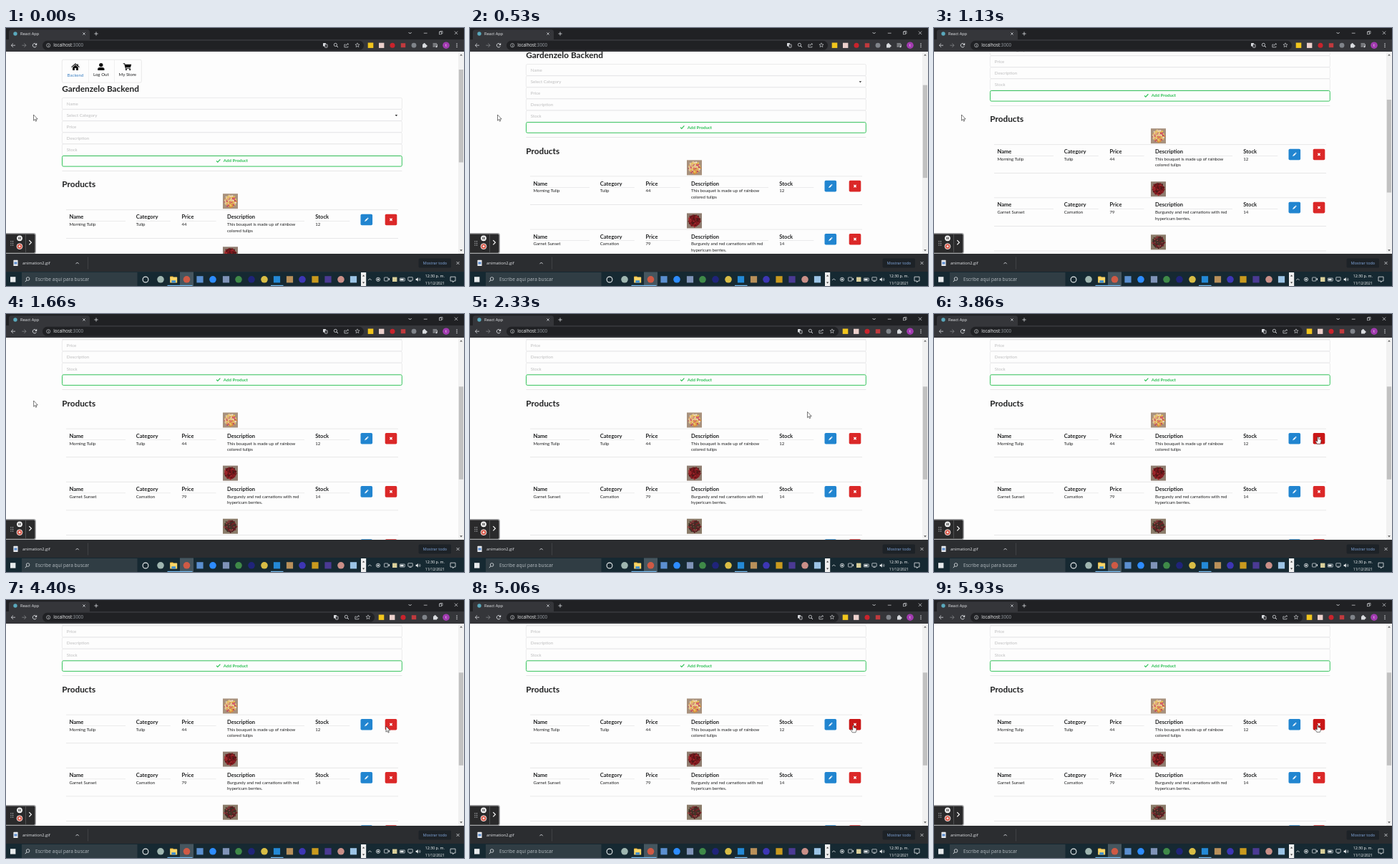
An HTML page with a canvas that plays this animation: 640 by 360 pixels, repeating every 8000 ms.

```html
<!DOCTYPE html>
<html lang="es">
<head>
<meta charset="utf-8">
<title>React App</title>
<style>
html, body { margin: 0; width: 100%; height: 100%; overflow: hidden; background: #fff; }
canvas { display: block; width: 640px; height: 360px; }
</style>
</head>
<body>
<canvas id="stage"></canvas>
<script>
const LOOP = 8000, STEP = 1000 / 15, TICK = 46.85;
const canvas = document.getElementById('stage');
const dpr = window.devicePixelRatio || 1;
canvas.width = 640 * dpr;
canvas.height = 360 * dpr;
const c = canvas.getContext('2d');
c.scale(dpr, dpr);

const LATO = 'Lato, sans-serif', UI = '"Open Sans", sans-serif';
const PAPER = '#fdfdfd', INK = '#1f2021', LINE = '#d9d9da', GREEN = '#2cc154', GREY = '#dadce0';
const BODY = 6.08;

// Drawing helpers
function rect(x, y, w, h, fill) { c.fillStyle = fill; c.fillRect(x, y, w, h); }

function box(x, y, w, h, r, fill, stroke, lw = 0.5) {
  c.beginPath();
  c.roundRect(x, y, w, h, r);
  if (fill) { c.fillStyle = fill; c.fill(); }
  if (stroke) { c.strokeStyle = stroke; c.lineWidth = lw; c.stroke(); }
}

function disc(x, y, r, fill, stroke, lw = 0.8) {
  c.beginPath();
  c.arc(x, y, r, 0, 7);
  if (fill) { c.fillStyle = fill; c.fill(); }
  if (stroke) { c.strokeStyle = stroke; c.lineWidth = lw; c.stroke(); }
}

function trace(points, close) {
  c.beginPath();
  for (let i = 0; i < points.length; i += 2) c.lineTo(points[i], points[i + 1]);
  if (close) c.closePath();
}

function line(points, color, lw = 0.8) {
  trace(points);
  c.strokeStyle = color;
  c.lineWidth = lw;
  c.stroke();
}

function poly(points, fill) { trace(points, true); c.fillStyle = fill; c.fill(); }

function cross(x, y, r, color, lw) {
  line([x - r, y - r, x + r, y + r], color, lw);
  line([x - r, y + r, x + r, y - r], color, lw);
}

function text(s, x, y, size, color, font = UI, weight = 400, align = 'left') {
  c.font = `${weight} ${size}px ${font}`;
  c.fillStyle = color;
  c.textAlign = align;
  c.fillText(s, x, y);
}

function at(x, y, draw) { c.save(); c.translate(x, y); draw(); c.restore(); }

function random(seed) {
  return () => (seed = (seed * 16807) % 2147483647) / 2147483647;
}

// Motion
const clamp = v => Math.max(0, Math.min(1, v));
const ease = v => v * v * (3 - 2 * v);
const ramp = (t, a, b) => ease(clamp((t - a) / (b - a)));

const scrollAt = t => TICK * (ramp(t, 130, 400) + ramp(t, 800, 1190));

const PATH = [
  [0, 38.5, 121], [1660, 38.5, 121], [2330, 471.5, 136.5], [2530, 474, 138],
  [3060, 536.5, 171.5], [3930, 536.5, 171.5], [4400, 531, 176],
  [5060, 535.5, 175], [5730, 535.5, 175], [5930, 536, 174.5], [LOOP, 536, 174.5]
];

function pointerAt(t) {
  const i = PATH.findIndex((p, n) => n && t <= p[0]);
  const [ta, xa, ya] = PATH[i - 1], [tb, xb, yb] = PATH[i];
  const k = ramp(t, ta, tb);
  return [xa + (xb - xa) * k, ya + (yb - ya) * k];
}

// Page
const products = [
  { name: 'Morning Tulip', kind: 'Tulip', price: '44', stock: '12',
    about: ['This bouquet is made up of rainbow', 'colored tulips'],
    back: '#a8917d', tones: ['#e8c24e', '#cf3a5c', '#efdcc2', '#d98a3a', '#b8405e', '#e6c58e'] },
  { name: 'Garnet Sunset', kind: 'Carnation', price: '79', stock: '14',
    about: ['Burgundy and red carnations with red', 'hypericum berries.'],
    back: '#8f7d70', tones: ['#8c1a20', '#5e1216', '#a82a2e', '#4c1a18', '#761a1e'] },
  { name: '', kind: '', price: '', stock: '', about: [],
    back: '#8a7b69', tones: ['#7a2026', '#3c3a26', '#5c1a20', '#9a4444', '#45302a'] }
];

function bouquet(x, y, p, seed) {
  rect(x, y, 21, 21, p.back);
  disc(x + 10.5, y + 10.5, 8.2, p.tones[p.tones.length - 1]);
  const rnd = random(seed);
  for (let i = 0; i < 56; i++) {
    const a = i * 2.4, r = 1.16 * Math.sqrt(i);
    disc(x + 10.5 + r * Math.cos(a), y + 10.5 + r * Math.sin(a), 0.7 + 0.6 * rnd(),
      p.tones[Math.floor(rnd() * p.tones.length)]);
  }
}

function product(p, i, hot) {
  const y = 231.2 + i * 74.1;
  const col = (title, value, x, w) => {
    text(title, x, y + 35.2, 7.55, INK, LATO, 700);
    rect(x, y + 38, w, 0.5, LINE);
    text(value, x, y + 45, BODY, INK, LATO);
  };
  bouquet(303, y, p, 77 + i * 31);
  rect(84, y + 22.3, 464, 0.6, LINE);
  col('Name', p.name, 88.5, 78.5);
  col('Category', p.kind, 181.8, 48);
  col('Price', p.price, 245.5, 48);
  col('Description', p.about[0] || '', 309, 108);
  col('Stock', p.stock, 432.3, 48);
  text(p.about[1] || '', 309, y + 53.3, BODY, INK, LATO);
  rect(84, y + 62, 464, 0.6, LINE);

  box(495.5, y + 28.5, 16.6, 15.6, 1.8, '#2185d0');
  at(503.8, y + 36.2, () => {
    c.rotate(Math.PI / 4);
    rect(-0.9, -1.9, 1.8, 4, '#fff');
    rect(-0.9, -3.2, 1.8, 0.9, '#fff');
    poly([-0.9, 2.4, 0.9, 2.4, 0, 3.6], '#fff');
  });
  box(529.7, y + 28.5, 16.6, 15.6, 1.8, hot ? '#c91616' : '#db2828');
  cross(538, y + 36.2, 1.6, '#fff', 1.35);
}

function menu() {
  box(78.3, 44.2, 111, 32, 2, PAPER, '#d4d4d5');
  rect(115, 44.5, 0.5, 31.5, '#e4e4e4');
  rect(151.5, 44.5, 0.5, 31.5, '#e4e4e4');
  at(97, 54.3, () => {
    line([-5.5, 0.3, 0, -4.3, 5.5, 0.3], '#111', 1.1);
    rect(2.5, -4, 1.3, 3, '#111');
    poly([-3.9, 0.6, 0, -2.7, 3.9, 0.6, 3.9, 4.7, 1.1, 4.7, 1.1, 1.6, -1.1, 1.6, -1.1, 4.7, -3.9, 4.7], '#111');
  });
  disc(132.8, 51.6, 2.7, '#111');
  box(128, 54.9, 9.6, 4.2, [3, 3, 1, 1], '#111');
  at(169.5, 54, () => {
    line([-5.8, -4.2, -3.8, -4.2, -2.2, 2.2, 4.4, 2.2], '#111', 1.1);
    poly([-3.4, -3.2, 5.7, -3.2, 4.5, 1.1, -2.5, 1.1], '#111');
    disc(-1.6, 4.1, 1.1, '#111');
    disc(3.7, 4.1, 1.1, '#111');
  });
  text('Backend', 97, 68.2, 6.15, '#4183c4', LATO, 400, 'center');
  text('Log Out', 132.8, 67.3, 6.15, INK, LATO, 400, 'center');
  text('My Store', 169.8, 67.3, 6.15, INK, LATO, 400, 'center');
}

function page(scroll, hot) {
  rect(0, 33, 640, 283, PAPER);
  c.save();
  c.beginPath();
  c.rect(0, 33, 632, 283);
  c.clip();
  c.translate(0, -scroll);
  menu();
  text('Gardenzelo Backend', 78.3, 88.6, 11.8, INK, LATO, 700);
  ['Name', 'Select Category', 'Price', 'Description', 'Stock'].forEach((s, i) => {
    const y = 97.4 + i * 16.15;
    box(78.4, y, 475, 15.9, 1.8, PAPER, LINE);
    text(s, 84.8, y + 10.2, 6.15, '#bdbdbe', LATO);
  });
  poly([543.6, 121, 547.2, 121, 545.4, 123.2], '#333');
  box(78.5, 178.5, 474.8, 14.6, 1.8, PAPER, GREEN, 0.95);
  line([294, 185.4, 295.8, 187.2, 299.4, 183.3], GREEN, 1.2);
  text('Add Product', 303.8, 187.4, 6.15, GREEN, LATO, 700);
  rect(78.4, 199, 475, 0.6, LINE);
  text('Products', 78.3, 222.4, 11.8, INK, LATO, 700);
  products.forEach((p, i) => product(p, i, hot && i === 0));
  c.restore();

  rect(632, 33, 8, 283, '#f1f1f1');
  rect(632.8, 58 + scroll * 0.462, 6.2, 129.5, '#c1c1c1');
  poly([634.2, 38.5, 637.8, 38.5, 636, 36.4], '#505050');
  poly([634.2, 309.3, 637.8, 309.3, 636, 311.4], '#505050');
}

// Browser frame
function tools(compact) {
  const d = compact ? 15 : 0;
  at(446 + d, 24, () => {
    box(-3, -3, 4, 4.6, 0.5, GREY);
    box(-0.5, -1.2, 3.6, 4.4, 0.5, '#35363a', GREY, 0.7);
  });
  at(461 + d, 24, () => { disc(-0.6, -0.6, 2.1, null, GREY); line([1, 1, 3, 3], GREY, 1); });
  at(475.7 + d, 24, () => {
    line([-1.2, -1, -2.8, -1, -2.8, 2.8, 2.2, 2.8, 2.2, 1.4], GREY, 0.7);
    line([-0.8, 1, 0.3, -1.2, 3, -1.2, 1.6, -2.8], GREY, 0.7);
  });
  at(491 + d, 24, () => {
    const pts = [];
    for (let i = 0; i < 10; i++) {
      const r = i % 2 ? 1.4 : 3.2, a = i * Math.PI / 5 - Math.PI / 2;
      pts.push(r * Math.cos(a), r * Math.sin(a));
    }
    trace(pts, true);
    c.strokeStyle = GREY;
    c.lineWidth = 0.6;
    c.stroke();
  });
  rect(505.7 + d, 20.5, 7.6, 7.4, '#f2c61d');
  rect(521 + d, 20.7, 7.4, 7.2, '#ecd0cc');
  disc(540 + d, 24.2, 3.5, '#c9232c');
  rect(551.8 + d, 21.2, 6.4, 6, '#c03a3e');
  disc(570 + d, 24.2, 3.4, '#80848a');
  at(585 + d, 24.4, () => {
    box(-3, -1.8, 5.2, 5, 0.6, GREY);
    disc(-0.4, -2.2, 1.2, GREY);
    disc(2.4, 0.6, 1.2, GREY);
  });
  if (!compact) {
    for (let i = 0; i < 3; i++) rect(596.5, 21.5 + i * 2, i < 2 ? 5.5 : 3.2, 0.8, GREY);
    disc(601.4, 26.2, 1.1, GREY);
    rect(602, 22.5, 0.7, 3.7, GREY);
  }
  disc(615, 24.2, 4.8, '#a23bb0');
  text('t', 615, 26.2, 5.4, '#fff', UI, 400, 'center');
  for (let i = -1; i < 2; i++) disc(630, 24.2 + i * 2.3, 0.75, GREY);
}

function chrome(compact) {
  rect(0, 0, 640, 16, '#202124');
  box(4, 2.2, 113, 15, [3.5, 3.5, 0, 0], '#35363a');
  rect(0, 16, 640, 17, '#35363a');
  disc(13, 8, 2.7, '#5aa9bd');
  text('React App', 20, 10, 5.6, '#e8eaed');
  cross(109, 8, 1.6, GREY, 0.8);
  line([123.4, 8, 128.6, 8], GREY);
  line([126, 5.4, 126, 10.6], GREY);
  line([562.6, 6, 564.6, 8, 566.6, 6], GREY, 0.9);
  line([583.8, 7.2, 588.6, 7.2], GREY, 0.7);
  c.strokeStyle = GREY;
  c.lineWidth = 0.6;
  c.strokeRect(605.4, 5.6, 3.2, 3.2);
  line([606.6, 5.4, 606.6, 4.4, 610, 4.4, 610, 7.8, 608.8, 7.8], GREY, 0.6);
  cross(629, 6.8, 2.2, GREY, 0.7);

  line([13, 24.2, 7.4, 24.2], GREY);
  line([10, 21.5, 7.3, 24.2, 10, 26.9], GREY);
  line([22.4, 24.2, 28, 24.2], '#85878a');
  line([25.4, 21.5, 28.1, 24.2, 25.4, 26.9], '#85878a');
  c.beginPath();
  c.arc(40, 24.2, 2.7, 0.4, 5.4);
  c.strokeStyle = GREY;
  c.lineWidth = 0.9;
  c.stroke();
  poly([43.2, 20.8, 43.2, 23.9, 40.1, 23.9], GREY);
  box(51, 17.8, 449 + (compact ? 15 : 0), 13, 6.5, '#202124');
  disc(59.2, 24.2, 2.6, null, GREY, 0.6);
  rect(58.9, 23.8, 0.7, 1.9, GREY);
  rect(58.9, 22.6, 0.7, 0.7, GREY);
  text('localhost', 66.3, 26.4, 6.2, '#f1f3f4');
  const w = c.measureText('localhost').width;
  text(':3000', 66.3 + w, 26.4, 6.2, '#9aa0a6');
  tools(compact);
}

function shelf() {
  rect(0, 315, 640, 25.2, '#2b2d30');
  box(10.4, 323.8, 6.2, 8.2, 0.6, '#e8eaed');
  rect(11.5, 326.4, 4, 3.2, '#5f8fd0');
  text('animation2.gif', 23, 330.2, 5.75, '#e8eaed');
  line([97.5, 329.2, 99.6, 327, 101.7, 329.2], GREY, 0.9);
  rect(114.3, 319.5, 0.5, 17, '#55575b');
  box(576.6, 321.4, 45.4, 13, 1.5, '#1d2227');
  text('Mostrar todo', 599.4, 330, 5.45, '#86aee6', UI, 400, 'center');
  cross(631.5, 328, 2, GREY, 0.8);
}

function recorder() {
  box(-2, 286.8, 43.2, 27.6, 2.5, '#2a2a2b', '#a5a6a8', 1.4);
  rect(27, 288, 0.6, 25.2, '#6a6b6d');
  for (let i = 0; i < 6; i++) disc(7 + (i % 2) * 2.6, 297.8 + (i >> 1) * 2.6, 0.7, '#b8babd');
  disc(19, 293.3, 3.9, '#f4f4f4');
  rect(17.4, 291.6, 1.1, 3.4, '#333');
  rect(19.5, 291.6, 1.1, 3.4, '#333');
  disc(19, 304.7, 3.9, '#d9503f', '#f4f4f4', 0.9);
  rect(17.7, 303.4, 2.6, 2.6, '#f4f4f4');
  line([32.3, 296.2, 35.4, 299.3, 32.3, 302.4], '#fff', 1.2);
}

const apps = [
  [216, 'd', '#9fb6b0'], [252.5, 'd', '#cf5a45'], [271, 's', '#5b8fd0'], [289, 'd', '#2d8cff'],
  [307.5, 's', '#7f93b8'], [325, 'd', '#3f8a48'], [343, 'd', '#20247a'], [361, 'd', '#d8bd45'],
  [378.5, 's', '#2489d6'], [396.5, 's', '#b8905a'], [414, 'd', '#3d36b4'], [432, 's', '#c99a1e'],
  [450, 's', '#4b3a94'], [468, 'd', '#c98f88'], [485.5, 's', '#9cc4e6']
];

function taskbar() {
  const ice = '#e6eaec';
  rect(0, 340.2, 640, 20, '#162932');
  rect(6, 347.2, 7.4, 7.4, ice);
  rect(22, 341, 161.5, 19, '#303d44');
  disc(30.6, 350, 2.3, null, ice, 0.8);
  line([28.9, 351.8, 26.8, 354.2], ice, 0.9);
  text('Escribe aquí para buscar', 41, 353.2, 6.6, '#b5bcc1');
  disc(195, 351, 3.9, null, ice, 1.1);
  rect(243, 340.5, 19, 19.5, '#46565f');
  for (const [x, shape, color] of apps) {
    if (shape === 'd') disc(x, 350.8, 4.8, color);
    else rect(x - 4.6, 346.2, 9.2, 9.2, color);
  }
  box(229.2, 346.4, 4.5, 3, 0.5, '#e0a526');
  box(229.2, 347.6, 10, 7.8, 0.5, '#f9d567');
  rect(231.4, 352.2, 5.6, 3.2, '#3f8fd2');
  for (const x of [225.5, 243, 370]) rect(x, 358.8, 17.5, 1.2, '#76b9ed');

  rect(496, 341, 7.2, 19, '#f0f0f0');
  poly([498, 346.5, 501.2, 346.5, 499.6, 344.4], '#333');
  poly([498, 354.5, 501.2, 354.5, 499.6, 356.6], '#333');
  line([506.2, 352, 508.4, 349.8, 510.6, 352], ice, 0.8);
  disc(520, 350.8, 2.6, null, ice, 0.8);
  rect(518.8, 349.8, 2.4, 2, ice);
  box(528.6, 348, 5.2, 5, 0.5, null, ice, 0.7);
  rect(534.6, 349.2, 1.4, 2.6, ice);
  rect(540, 347.6, 6.4, 6.4, '#d9cf9a');
  box(550.4, 349, 6.8, 4, 0.4, null, ice, 0.7);
  rect(551.2, 349.8, 4.4, 2.4, ice);
  box(561.8, 347.8, 6.4, 4.4, 0.3, null, ice, 0.7);
  rect(563.4, 353.3, 3.2, 0.7, ice);
  poly([572.6, 349.7, 574, 349.7, 575.8, 348, 575.8, 353.8, 574, 352.1, 572.6, 352.1], ice);
  for (const r of [1.6, 3.1]) {
    c.beginPath();
    c.arc(575.8, 350.9, r, -0.8, 0.8);
    c.strokeStyle = ice;
    c.lineWidth = 0.6;
    c.stroke();
  }
  text('12:30 p. m.', 599.3, 348, 5.3, '#fff', UI, 400, 'center');
  text('11/12/2021', 599.3, 357.6, 5.1, '#fff', UI, 400, 'center');
  trace([621, 347.2, 628, 347.2, 628, 353, 626, 353, 624.5, 354.8, 624.5, 353, 621, 353], true);
  c.strokeStyle = ice;
  c.lineWidth = 0.8;
  c.stroke();
}

function pointer(x, y, hand) {
  at(x, y, () => {
    c.lineJoin = 'round';
    if (hand) {
      trace([-0.7, 0, 0.7, 0, 0.8, 3, 4, 3.8, 4.6, 4.8, 4.2, 7.6, 3.4, 9.8,
        -1.2, 9.8, -3.4, 6.2, -2.8, 5.3, -0.8, 6.6], true);
    } else {
      trace([0, 0, 0, 8.2, 1.9, 6.4, 3, 9.2, 4.3, 8.6, 3.2, 6, 5.7, 6], true);
    }
    c.fillStyle = '#fff';
    c.fill();
    c.strokeStyle = '#222';
    c.lineWidth = 0.6;
    c.stroke();
    c.lineJoin = 'miter';
  });
}

function draw(t) {
  const [x, y] = pointerAt(t);
  const hot = x > 532 && x < 546 && y > 165.5 && y < 181.5;
  const compact = t >= 1800;
  page(scrollAt(t), hot);
  chrome(compact);
  shelf();
  taskbar();
  recorder();
  pointer(x, y, hot);
}

let start = null, last = -1;
function tick(now) {
  if (start === null) start = now;
  const step = Math.floor(((now - start) % LOOP + 7) / STEP);
  if (step !== last) {
    last = step;
    draw(Math.min(step * STEP, LOOP));
  }
  requestAnimationFrame(tick);
}
draw(0);
requestAnimationFrame(tick);
</script>
</body>
</html>
```
